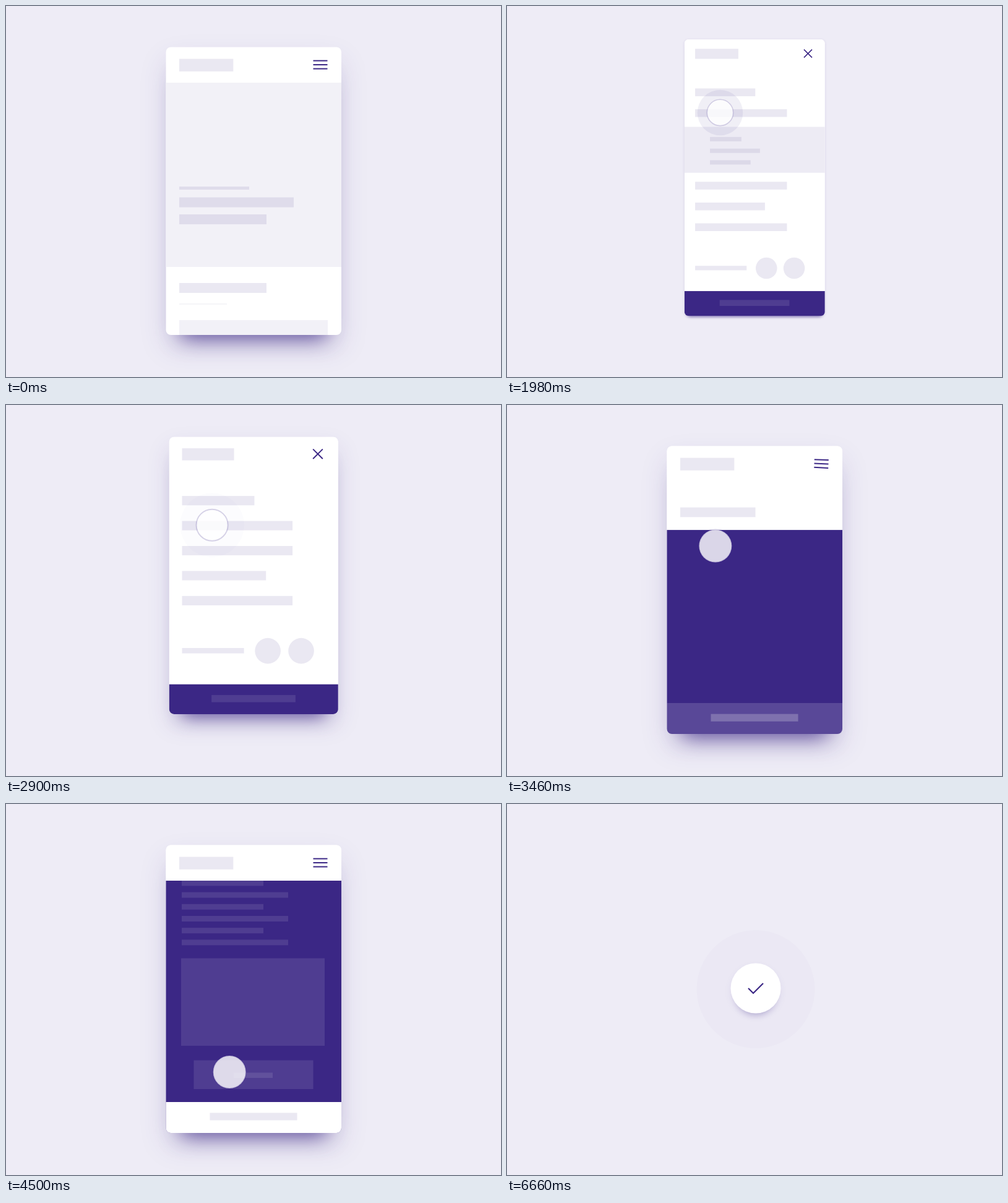
An HTML page with a canvas for the animation above (8.08 s loop, 800 by 600 pixels).

```html
<!DOCTYPE html>
<html lang="en">
<head>
<meta charset="utf-8">
<title>Mobile menu flow</title>
<style>
  html, body { margin: 0; width: 100%; height: 100%; overflow: hidden; background: #eeecf6; }
  canvas { display: block; }
</style>
</head>
<body>
<canvas id="stage" width="800" height="600"></canvas>
<script>
const ctx = document.getElementById('stage').getContext('2d');
const LOOP = 8080;
const CARD = { x: 258.5, y: 66.5, w: 283.5, h: 465.5, cx: 400.25, cy: 299.25 };
const BG = '#eeecf6', DARK = '#3b2785', BAR = '#eae8f2', HERO = '#f2f1f7', TITLE = '#dfdceb';

// Progress helpers: linear, eased both ways, eased out
const lin = (t, a, b) => Math.min(1, Math.max(0, (t - a) / (b - a)));
const sine = (t, a, b) => (1 - Math.cos(Math.PI * lin(t, a, b))) / 2;
const out = u => 1 - (1 - u) ** 3;
const mix = (a, b, u) => a + (b - a) * u;

function rect(x, y, w, h, color) {
  ctx.fillStyle = color;
  ctx.fillRect(x, y, w, h);
}

function disc(x, y, r, color) {
  ctx.fillStyle = color;
  ctx.beginPath();
  ctx.arc(x, y, r, 0, 7);
  ctx.fill();
}

function round(x, y, w, h, r) {
  ctx.beginPath();
  ctx.roundRect(x, y, w, h, r);
}

function faded(alpha, draw) {
  if (alpha <= 0) return;
  ctx.save();
  ctx.globalAlpha *= alpha;
  draw();
  ctx.restore();
}

// Two soft layers: a wide pale one and a narrow purple one below
function shadow(x, y, w, h, r, lift, strength) {
  const layer = (inset, dy, blur, alpha) => {
    ctx.save();
    ctx.shadowColor = `rgba(59,39,133,${alpha * strength})`;
    ctx.shadowBlur = blur;
    ctx.shadowOffsetX = 2000;
    ctx.shadowOffsetY = dy;
    ctx.fillStyle = '#000';
    round(x + inset - 2000, y + inset, w - 2 * inset, h - 2 * inset, r);
    ctx.fill();
    ctx.restore();
  };
  const inset = 4 + 20 * lift;
  layer(0, 1 + 20 * lift, 4 + 42 * lift, 0.13);
  layer(inset, inset + 2 + 3 * lift, 4 + 30 * lift, 0.55 + 0.25 * lift);
}

function home() {
  rect(258, 124, 285, 298, HERO);
  rect(280, 292, 113, 5, TITLE);
  rect(280, 309.5, 185, 16, TITLE);
  rect(280, 337, 141, 16, TITLE);
  rect(280, 448, 141, 16, BAR);
  rect(280, 481.5, 77, 1, '#ececf2');
  rect(280, 508, 240, 24, HERO);
}

function menu(t, open) {
  rect(258, 66, 285, 570, '#fff');
  const appear = (i, draw) => {
    const p = lin(t, 780 + i * 100, 980 + i * 100);
    faded(p, () => {
      ctx.translate(-14 * (1 - out(p)), 0);
      draw();
    });
  };
  [121.5, 185.5, 185.5, 141, 185.5].forEach((w, i) => appear(i, () =>
    rect(280, 165.6 + 42 * i + (i > 1 ? 105.5 * open : 0), w, 15.7, BAR)));
  appear(5, () => rect(280, 421 + 104 * open, 104, 9, BAR));
  appear(6, () => disc(424, 425.8 + 104 * open, 21.6, BAR));
  appear(7, () => disc(480, 425.8 + 104 * open, 21.6, BAR));

  ctx.save();
  ctx.beginPath();
  ctx.rect(258, 243, 285, 94 * open);
  ctx.clip();
  rect(258, 243, 285, 94, '#edebf4');
  [63.5, 101, 82].forEach((w, i) => rect(310, 263.7 + 23.5 * i, w, 8.8, '#dcd9e8'));
  ctx.restore();
}

function article(t) {
  const top = mix(482, 124, sine(t, 3240, 3560));
  ctx.save();
  ctx.beginPath();
  ctx.rect(258, top, 285, 482 - top);
  ctx.clip();
  rect(258, top, 285, 482 - top, DARK);
  const u = lin(t, 3820, 4440);
  ctx.translate(0, 58.1 - 414.6 * (1 - (1 - u * u) ** 9));
  faded(lin(t, 3480, 3680), () => {
    const tint = 'rgba(255,255,255,.1)';
    rect(284, 107, 172, 9, tint);
    rect(284.5, 126, 101, 9, tint);
    rect(258, 178.5, 285, 141.5, tint);
    for (let i = 0; i < 13; i++)
      rect(284, 345.5 + 19.2 * i, i > 2 && i % 2 ? 132 : 172, 9, tint);
    rect(283, 606, 232, 141.5, tint);
    rect(303.5, 771, 193, 46.5, tint);
    rect(368, 791, 63, 8.5, tint);
  });
  ctx.restore();
}

function bottomBar(t, open) {
  const y = 482 + 94 * open + 52 * (1 - sine(t, 720, 900));
  const light = sine(t, 3400, 3640);
  rect(258, y, 285, 60, DARK);
  rect(329.5, y + 18, 141, 12, 'rgba(255,255,255,.1)');
  faded(light, () => {
    rect(258, y, 285, 60, '#fff');
    rect(329.5, y + 17.5, 141, 12, BAR);
  });
}

function burger(t) {
  const k = sine(t, 660, 980) * (1 - sine(t, 3220, 3480));
  ctx.save();
  ctx.translate(508, 95);
  ctx.rotate(-Math.PI * (1 - k));
  [-1, 0, 1].forEach(side => faded(side ? 1 : 1 - k, () => {
    ctx.translate(0, 6.5 * side * (1 - k));
    ctx.rotate(-side * k * Math.PI / 4);
    rect(-11.5, -1, 23, 2, DARK);
  }));
  ctx.restore();
}

function tap(t, start, x, y) {
  const u = lin(t, start, start + 500);
  if (u > 0 && u < 1) disc(x, y, 27 + 27 * out(u), `rgba(59,39,133,${0.11 * (1 - u)})`);
}

function cursor(t) {
  // start, end, x, y of each move
  const moves = [[280, 640, 516.5, 98.5], [1100, 1560, 330.5, 214.5], [3400, 3780, 432, 430],
                 [3820, 4000, 432, 304], [4060, 4480, 361.2, 433.5]];
  let x = 612, y = 190;
  for (const [a, b, mx, my] of moves) {
    const p = sine(t, a, b);
    x = mix(x, mx, p);
    y = mix(y, my, p);
  }
  tap(t, 675, x, y);
  tap(t, 1815, x, y);
  tap(t, 2450, x, y);
  tap(t, 4790, x, y);
  faded(lin(t, 280, 440) * (1 - lin(t, 4980, 5140)), () => {
    const press = sine(t, 3760, 3840) * (1 - sine(t, 4020, 4140));
    const r = 26.5 - 3.5 * press;
    disc(x, y, r, 'rgba(255,255,255,.81)');
    ctx.lineWidth = 2;
    ctx.strokeStyle = 'rgba(59,39,133,.2)';
    ctx.stroke();
  });
}

function screen(t) {
  const shrink = sine(t, 640, 1240) * (1 - sine(t, 2500, 3060));
  const rise = sine(t, 600, 1040) * (1 - sine(t, 2720, 3040));
  const open = sine(t, 1830, 1990) * (1 - sine(t, 2440, 2640));
  const s = 1 - 0.2 * shrink, cy = CARD.cy - 59 * rise;
  const h = CARD.h + 94 * open;

  shadow(CARD.cx - CARD.w / 2 * s, cy - CARD.h / 2 * s, CARD.w * s, h * s, 8 * s, 1 - shrink, 1);
  ctx.save();
  ctx.translate(CARD.cx, cy);
  ctx.scale(s, s);
  ctx.translate(-CARD.cx, -CARD.cy);

  ctx.save();
  round(CARD.x, CARD.y, CARD.w, h, 8);
  ctx.clip();
  rect(258, 66, 285, h + 1, '#fff');
  if (t < 900) home();
  faded(lin(t, 700, 860), () => menu(t, open));
  if (t > 3240) article(t);
  bottomBar(t, open);
  rect(280, 85.5, 87.3, 20.3, BAR);
  burger(t);
  ctx.restore();

  cursor(t);
  ctx.restore();
}

function collapse(t) {
  const p = sine(t, 5040, 5500);
  const x = mix(CARD.cx, 402, p), y = mix(CARD.cy, 298, p);
  const w = mix(CARD.w, 81, p), h = mix(CARD.h, 81, p), r = mix(8, 40.5, p);

  const ring = lin(t, 5600, 6490);
  if (ring > 0)
    disc(402, 299.5, 41 + 54.5 * (1 - (1 - ring) ** 2), `rgba(59,39,133,${mix(0.07, 0.014, ring)})`);
  shadow(x - w / 2, y - h / 2, w, h, r, mix(1, 0.2, p), mix(1, 0.45, p));
  round(x - w / 2, y - h / 2, w, h, r);
  ctx.fillStyle = '#fff';
  ctx.fill();

  const draw = sine(t, 5640, 5960);
  if (draw > 0) {
    ctx.beginPath();
    ctx.moveTo(390, 298);
    ctx.lineTo(398, 306);
    ctx.lineTo(414, 290);
    ctx.setLineDash([34 * draw, 60]);
    ctx.lineWidth = 2.2;
    ctx.strokeStyle = DARK;
    ctx.stroke();
    ctx.setLineDash([]);
  }
}

function frame(now) {
  const t = now % LOOP;
  rect(0, 0, 800, 600, BG);
  if (t < 4940) screen(t);
  else {
    collapse(t);
    // The page fades away over the white card before it shrinks
    faded(1 - lin(t, 4940, 5060), () => screen(t));
  }
  requestAnimationFrame(frame);
}
requestAnimationFrame(frame);
</script>
</body>
</html>
```
